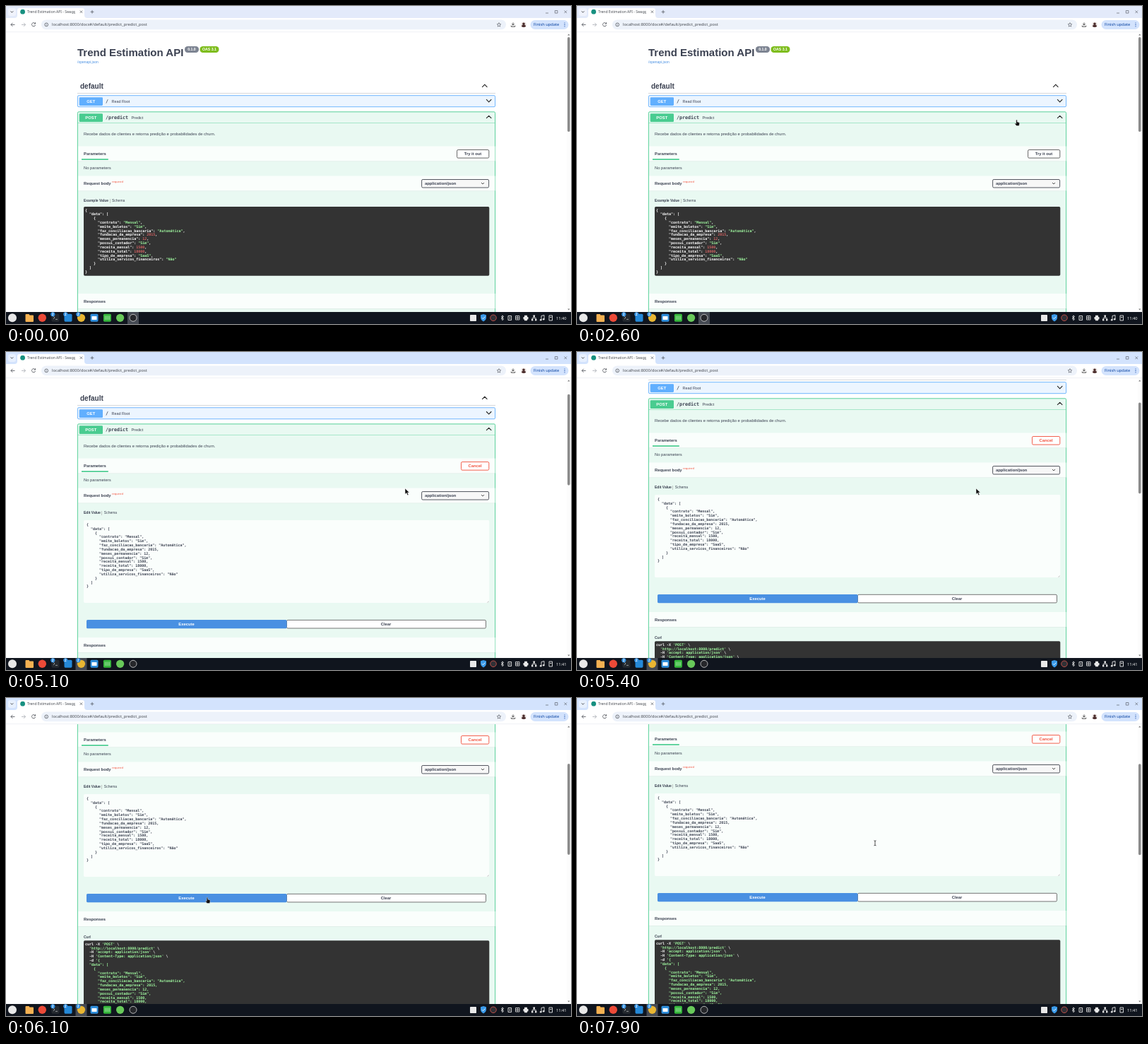
Animation, 800 px wide and 450 px high, one loop 8000 ms. Source, as an HTML page:

```html
<!DOCTYPE html>
<html lang="pt">
<head>
<meta charset="utf-8">
<title>API docs</title>
<style>
  html, body { margin: 0; width: 100%; height: 100%; overflow: hidden; background: #fff; }
  svg { display: block; width: 100vw; height: 100vh; }
  text { white-space: pre; fill: #3b4151; font: 5.83px "Liberation Sans", Arial, sans-serif; }
  .b { font-weight: 700; }
  .ui { font-family: "Noto Sans", sans-serif; fill: #474b52; }
  .code { font: 700 5px "DejaVu Sans Mono", monospace; }
  .path { font: 700 6.67px "DejaVu Sans Mono", monospace; }
  .dark { fill: #fff; }
  .str { fill: #a2fca2; }
  .num { fill: #d36363; }
</style>
</head>
<body>
<svg id="stage" viewBox="0 0 800 450"></svg>
<script>
const LOOP = 8000;
const FOCUS_AT = 3800, EDIT_AT = 3900, MINUTE_AT = 3300;
const INK = '#3b4151', GET = '#61affe', POST = '#49cc90';

// Markup helpers
const text = (x, y, s, size, cls = '', extra = '') =>
  `<text x="${x}" y="${y}" class="${cls}" style="${size ? `font-size:${size}px;` : ''}${extra}">${s}</text>`;
const centred = (x, y, s, fill, size = 5.83) =>
  text(x, y, s, size, 'b', `text-anchor:middle;fill:${fill}`);
const rect = (x, y, w, h, fill, r = 0, extra = '') =>
  `<rect x="${x}" y="${y}" width="${w}" height="${h}" rx="${r}" fill="${fill}" ${extra}/>`;
const outlined = (x, y, w, h, fill, stroke, width = .9) =>
  rect(x, y, w, h, fill, 1.6, `stroke="${stroke}" stroke-width="${width}"`);
const circle = (x, y, r, fill, extra = '') => `<circle cx="${x}" cy="${y}" r="${r}" fill="${fill}" ${extra}/>`;
const line = (d, stroke = INK, width = 1) =>
  `<path d="${d}" fill="none" stroke="${stroke}" stroke-width="${width}" stroke-linejoin="round"/>`;
const chevron = (x, y, dir, size = 3.6, width = 1.1) =>
  line(`M${x - size} ${y - dir * size / 2}l${size} ${dir * size}l${size} ${-dir * size}`, '#222', width);
const group = (id, body, extra = '') => `<g id="${id}" ${extra}>${body}</g>`;
const codeLines = (x, y, lines, cls) =>
  lines.map((s, i) => text(x, y + i * 5.83, s, 0, 'code ' + cls)).join('');
const span = (s, cls) => `<tspan class="${cls}">${s}</tspan>`;

const json = JSON.stringify({ data: [{
  contrato: 'Mensal', emite_boletos: 'Sim', faz_conciliacao_bancaria: 'Automática',
  fundacao_da_empresa: 2015, meses_permanencia: 12, possui_contador: 'Sim',
  receita_mensal: 1500, receita_total: 18000, tipo_de_empresa: 'SaaS',
  utiliza_servicos_financeiros: 'Não'
}] }, null, 2).split('\n');

const coloredJson = json.map(s => s.replace(/(: )("[^"]*"|\d+)/,
  (_, sep, value) => sep + span(value, value[0] === '"' ? 'str' : 'num')));

const curl = [
  ...["curl -X 'POST' \\", "  'http://localhost:8000/predict' \\", "  -H 'accept: application/json' \\",
    "  -H 'Content-Type: application/json' \\", "  -d '{"]
    .map(s => s.replace(/'[^']*'?/, q => span(q, 'str'))),
  ...json.slice(1, -1).map(s => span(s, 'str')), span("}'", 'str')
];

function sectionBar(y, title) {
  return rect(102, y, 590.5, 21, '#fff', 0, 'opacity=".8"') +
    rect(102, y + 21, 590.5, .6, '#000', 0, 'opacity=".07"') +
    text(110, y + 12.6, title, 0, 'b');
}

function operation(y, height, color, method, path, summary, summaryX, dir) {
  return rect(101.4, y, 591.2, height, color, 1.7, 'fill-opacity=".12"') +
    outlined(101.4, y, 591.2, height, 'none', color, .9) +
    rect(103.7, y + 2.5, 33.3, 11.7, color, 1.3) +
    centred(120.3, y + 10.5, method, '#fff') +
    text(141, y + 10.3, path, 0, 'path') +
    text(summaryX, y + 10, summary, 5.42) +
    chevron(683.7, y + 7.3, dir);
}

function pageMarkup() {
  const header =
    text(101, 70.8, 'Trend Estimation API', 15, 'b') +
    rect(253, 57, 20, 9, '#7d8492', 4.2) + centred(263, 63.4, '0.1.0', '#fff', 5.2) +
    rect(274.5, 57, 27, 9, '#7ebd1d', 4.2) + centred(288, 63.4, 'OAS 3.1', '#fff', 5.2) +
    text(101, 80.6, '/openapi.json', 5, '', 'fill:#4990e2') +
    text(105, 116.8, 'default', 10, 'b') + chevron(677.8, 113, -1) +
    rect(101, 123.3, 592, .6, INK, 0, 'opacity=".35"');

  const predict =
    operation(149.8, 1300, POST, 'POST', '/predict', 'Predict', 177.5, -1) +
    rect(101.4, 165, 591.2, .6, POST, 0, 'opacity=".7"') +
    text(110, 183.2, 'Recebe dados de clientes e retorna predição e probabilidades de churn.') +
    sectionBar(198.5, 'Parameters') + rect(107, 216.2, 37.8, 1.7, POST) +
    text(110, 231.3, 'No parameters') +
    sectionBar(240.5, 'Request body') +
    text(150, 250.4, 'required', 4.3, '', 'fill:#f2503b') +
    outlined(588.6, 245.5, 95, 11.5, '#f7f7f7', '#41444e') +
    text(593, 253.2, 'application/json', 0, 'b') + chevron(675, 251, 1, 2, .8);

  const example =
    outlined(638.6, 203.5, 45.2, 11.6, '#fff', '#555') + centred(661, 211.4, 'Try it out', INK) +
    text(110, 277.4, 'Example Value', 5, 'b') + rect(147, 273, .5, 6, '#999') + text(150, 277.4, 'Schema', 5) +
    rect(110, 284, 574.3, 97.8, '#333', 1.7) + codeLines(112, 290.5, coloredJson, 'dark') +
    sectionBar(407, 'Responses');

  const edit =
    group('cancel', outlined(644.5, 203.5, 39.3, 11.6, '#fff', 'currentColor') +
      centred(664, 211.4, 'Cancel', 'currentColor')) +
    text(110, 277.4, 'Edit Value', 5, 'b') + rect(135.4, 273, .5, 6, '#999') + text(138.8, 277.4, 'Schema', 5) +
    rect(110, 286, 574.3, 117, '#fff', 1.7, 'opacity=".8"') + codeLines(114, 293.9, json, '') +
    line('M681.5 402.5l2-2m-.8 2l.8-.8', '#777', .4) +
    outlined(397.5, 427.3, 282, 11.6, '#fff', '#666') + centred(538, 435.2, 'Clear', INK) +
    rect(114, 427, 283.6, 12.2, '#4990e2', 1.6) + centred(255.5, 435.2, 'Execute', '#fff') +
    sectionBar(452, 'Responses') +
    text(110, 489.9, 'Curl', 5, 'b') +
    rect(110, 493.3, 574.3, 140, '#333', 1.7) + codeLines(112, 499.8, curl, 'dark');

  return header + operation(126.7, 16, GET, 'GET', '/', 'Read Root', 149.5, 1) +
    predict + group('example', example) + group('edit', edit);
}

function browserMarkup() {
  const icon = '#474b52';
  return rect(0, 0, 800, 20, '#d3e3fd', 0, 'id="strip"') +
    rect(0, 17, 800, 20, '#fff') +
    '<path d="M12 17q4 0 4-4V6q0-3 3-3h89q3 0 3 3v7q0 4 4 4z" fill="#fff"/>' +
    rect(3, 3, 11, 11, '#fff', 3, 'opacity=".45"') + chevron(8.4, 8.3, 1, 1.8, .8) +
    circle(23.6, 8.2, 3.4, '#179080') +
    '<clipPath id="tabClip"><rect x="30" width="68" height="17"/></clipPath>' +
    `<g clip-path="url(#tabClip)">${text(30, 10.2, 'Trend Estimation API - Swagger UI', 5, 'ui')}</g>` +
    line('M104.8 6.5l3.4 3.4m0-3.4l-3.4 3.4M119.6 8.3h4.8m-2.4-2.4v4.8', icon, .7) +
    line('M764 10h4M777.3 6.5h3.6v3.6h-3.6zM790.5 6.5l3.6 3.6m0-3.6l-3.6 3.6', icon, .6) +
    line('M12.5 26.4H7m2.4-2.5L6.9 26.4l2.5 2.5', icon, .8) +
    line('M22 26.4h5.5m-2.4-2.5l2.5 2.5l-2.5 2.5', '#a7abb2', .8) +
    line('M41.3 24.8a2.6 2.6 0 1 0 .3 2.2M41.6 23.2v2h-2', icon, .8) +
    rect(50, 19.6, 658, 13.6, '#edf2fa', 6.8) +
    circle(57.2, 26.4, 2.4, 'none', `stroke="${icon}" stroke-width=".7"`) + line('M57.2 26v1.6m0-2.8v.6', icon, .6) +
    text(65, 28.4, 'localhost:8000/docs#/default/predict_predict_post', 5.72, 'ui') +
    line('M698 23.6l.8 1.9l2 .2l-1.5 1.4l.4 2l-1.7-1l-1.7 1l.4-2l-1.5-1.4l2-.2z', icon, .6) +
    line('M718 23.5v3.6m-1.8-1.7l1.8 1.8l1.8-1.8M715.3 27.7v1.5h5.4v-1.5', '#222', .8) +
    circle(733, 26.4, 3.8, '#ece5e2') + circle(733, 25.3, 1.7, '#4a2c2b') +
    '<path d="M730 29q0-2.6 3-2.6t3 2.6q-3 2.2-6 0z" fill="#4a2c2b"/>' +
    rect(742.5, 20, 54, 13, '#d3e3fd', 6.5) +
    text(747, 28.4, 'Finish update', 5.72, 'ui', 'fill:#0842a0;font-weight:500') +
    [24, 26.4, 28.8].map(y => circle(791, y, .6, '#0842a0')).join('') +
    rect(0, 36.6, 800, .5, '#dfe3ea') +
    rect(794, 37, 6, 396, '#fcfcfc') + rect(795, 44, 3.6, 134, '#8b8b8b', 1.8, 'id="thumb"') +
    '<path d="M795.2 41.4l1.6-2l1.6 2zM795.2 428.5h3.2l-1.6 2z" fill="#777"/>';
}

function taskbarMarkup() {
  const badge = (x) => circle(x, 436.3, 3.1, '#2d8de0') + centred(x, 438, '2', '#fff', 4.5);
  const tile = (x, fill) => rect(x - 5.5, 435.7, 11, 11, fill, 1.6);
  const white = '#e8e8e8';
  return rect(0, 433, 800, 17, '#10151e') +
    rect(172, 433, 16, 17, '#454a53', 0, 'id="active"') +
    circle(9, 441.3, 6, '#e8e8e8') +
    '<path d="M27.5 437q0-1 1-1h4l1 1.4h4.5q1 0 1 1v7.5q0 1-1 1H28.500q-1 0-1-1z" fill="#f4b152"/>' +
    circle(51.3, 441.3, 5.7, '#ec4a38') +
    tile(70, '#252a30') + line('M67 439l2 2l-2 2m3 .4h3', '#ddd', .6) +
    tile(88, '#2589d8') + circle(106.5, 441.3, 5.6, '#e9b632') +
    tile(125, '#2f8fdc') + rect(121.5, 439, 7, 5, '#fff', .6) +
    tile(143.4, '#36b83c') + line('M140.500 438.500v5.500m2-5.500v5.500m2-5.500v5.500m2-5.500v5.500', '#d9f5d9', .6) +
    circle(161.6, 441.3, 5.6, '#68c95a') +
    circle(180, 441.3, 5, '#26272b', 'stroke="#d8d8d8" stroke-width=".8"') +
    badge(66.3) + badge(84.3) + badge(102.3) +
    rect(657, 437, 9, 9, white, .8) +
    '<path d="M676 436l4 1.3v3.500q0 3.700-4 5.700q-4-2-4-5.700v-3.500z" fill="#3b9bea"/>' +
    line('M674 441.200l1.500 1.500l2.700-3', '#fff', .9) +
    circle(690, 441.3, 4.3, '#303136', 'stroke="#e0584e" stroke-width=".8"') +
    line('M701 439.5l3.600 3.500l-1.800 1.700v-6.800l1.800 1.600l-3.600 3.500', white, .9) +
    line('M711 438.500h4.600v6H711zM713.300 440v3', white, .9) +
    line('M721.500 438.500h5.500v5.500h-5.500zM724.200 438.500v5.500m-2.700-2.700h5.500', white, .8) +
    rect(732.5, 440, 7, 3.4, white, .6) + rect(734, 437.7, 4, 7.6, white, .4) +
    line('M747.700 438v3m-2.600 3v-2.500h5.200v2.500', white, .9) +
    rect(746.4, 437.5, 2.6, 2.5, white) + rect(744, 443, 2.4, 2.4, white) + rect(749, 443, 2.4, 2.4, white) +
    line('M758 444.500v-6l4-1v5.500', white, .9) + circle(757.2, 444.2, 1.3, white) + circle(761.2, 443.2, 1.3, white) +
    line('M769 438h4.500v7H769zM770 440.500h2.500', white, .9) +
    text(779, 443.5, '11:40', 5.72, 'ui', 'fill:#f4f4f4').replace('<text', '<text id="clock"');
}

const cursors = {
  arrow: '<path d="M0 0v8.3l2-1.8l1.500 3.300l1.500-.7l-1.500-3.200h2.700z" fill="#111" stroke="#fff" stroke-width=".5"/>',
  hand: '<path d="M-.8 0q.8-.9 1.600 0v2.500l2.600.8q.9.300.7 1.300l-.6 3.400h-3.800l-2.400-3q.5-1 1.900.100z" fill="#111" stroke="#fff" stroke-width=".4"/>',
  beam: line('M-1.500 -3.500q1.500 0 1.500.8q0-.8 1.500-.8M0-3v6M-1.500 3.500q1.500 0 1.500-.8q0 .8 1.500.8', '#222', .8)
};

const stage = document.getElementById('stage');
stage.innerHTML =
  rect(0, 0, 800, 450, '#fff') + group('page', pageMarkup()) +
  browserMarkup() + taskbarMarkup() +
  group('cursor', Object.entries(cursors).map(([kind, shape]) => group(kind, shape)).join(''));
const el = id => document.getElementById(id);

// Keyframes: time, then values eased between neighbours
const scrollKeys = [[0, 0], [4800, 0], [5350, 84], [5600, 84], [6100, 150], [6200, 151]];
const cursorKeys = [[2000, 687, 62], [2350, 681, 130], [2600, 622.5, 161.5], [2850, 622.5, 161.5], [3500, 665.5, 207.5],
  [4250, 665.5, 207.5], [4900, 565, 193], [5450, 565, 193], [6000, 285, 282.5], [6600, 285, 282.5], [7300, 422, 205.3]];

function sample(keys, t) {
  const next = keys.findIndex(k => k[0] > t);
  if (next < 0) return keys[keys.length - 1].slice(1);
  if (next === 0) return keys[0].slice(1);
  const a = keys[next - 1], b = keys[next];
  const u = (t - a[0]) / (b[0] - a[0]), e = u * u * (3 - 2 * u);
  return a.slice(1).map((v, i) => v + (b[i + 1] - v) * e);
}

const show = (id, on) => el(id).setAttribute('visibility', on ? 'visible' : 'hidden');

function cursorKind(t) {
  if (t < 2450) return 'arrow';
  if (t < 4400) return 'hand';
  if (t < 5900) return 'arrow';
  return t < 6750 ? 'hand' : 'beam';
}

function render(t) {
  const editing = t >= EDIT_AT, focused = t >= FOCUS_AT;
  const [scroll] = sample(scrollKeys, t), [x, y] = sample(cursorKeys, t);
  el('page').setAttribute('transform', `translate(0 ${-scroll})`);
  show('example', !editing);
  show('edit', editing);
  el('cancel').style.color = t < 4400 ? '#c4382f' : '#f2503b';
  el('thumb').setAttribute('y', 44 + scroll * .326);
  el('thumb').setAttribute('height', editing ? 129 : 134);
  el('strip').setAttribute('fill', focused ? '#d3e3fd' : '#e3eafa');
  el('active').setAttribute('x', focused ? 98.5 : 172);
  el('clock').textContent = t < MINUTE_AT ? '11:40' : '11:41';
  el('cursor').setAttribute('transform', `translate(${x} ${y})`);
  for (const kind in cursors) show(kind, t >= 2000 && kind === cursorKind(t));
}

function tick() {
  render(performance.now() % LOOP);
  requestAnimationFrame(tick);
}
tick();
</script>
</body>
</html>
```
